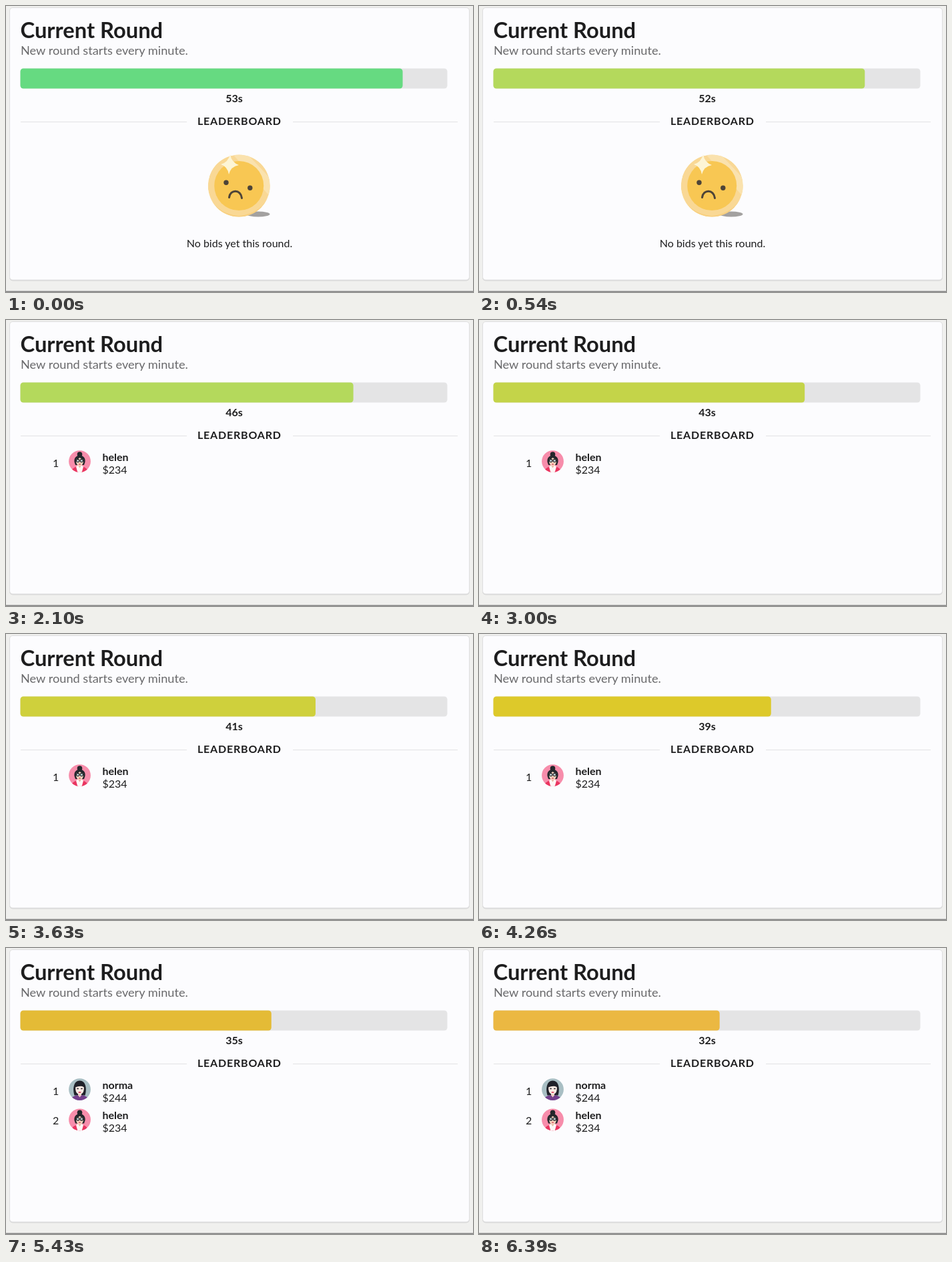
An HTML page for the animation above (6.57 s loop, 700 px wide and 428 px high).

```html
<!DOCTYPE html>
<html lang="en">
<head>
<meta charset="utf-8">
<title>Current Round</title>
<style>
  html, body { margin: 0; width: 100%; height: 100%; overflow: hidden; background: #f0f0ee; }
  svg { display: block; width: 700px; height: 428px; }
  text { font-family: Lato, "Open Sans", sans-serif; font-size: 16px; fill: #1d1d1e; }
  .bold { font-weight: 700; }
  .mid { text-anchor: middle; }
</style>
</head>
<body>
<svg viewBox="0 0 700 428">
  <defs>
    <clipPath id="disc"><circle r="16.4"/></clipPath>
    <clipPath id="coin"><circle cx="349.2" cy="269" r="46.5"/></clipPath>

    <g id="bun" clip-path="url(#disc)">
      <circle r="17" fill="#f78dab"/>
      <circle cy="-10.500" r="3.800" fill="#24262b"/>
      <path d="M-8 1C-10-12 10-12 8 1L6.500 5.500H-6.500Z" fill="#24262b"/>
      <path d="M-2.500 4H2.500V11H-2.500Z" fill="#e6b9a0"/>
      <path d="M-13 17C-12 10-7 8.500-3 7.500L0 13L3 7.500C7 8.500 12 10 13 17Z" fill="#ea3560"/>
      <path d="M-5.500 8L-2.500 6L0 10L2.500 6L5.500 8L3 17H-3Z" fill="#fdf7f6"/>
      <path d="M-5.500-4Q0-8 5.500-4V1Q4 7 0 7Q-4 7-5.500 1Z" fill="#f6d3bd"/>
      <path d="M-6-2.500Q-4-8 1-8Q6-8 6-2.500Q2-3.500 0-5.500Q-2-3-6-2.500Z" fill="#24262b"/>
      <g fill="#b9cdd0" stroke="#24262b" stroke-width="1.100">
        <circle cx="-2.800" cy="-1" r="2.200"/><circle cx="2.800" cy="-1" r="2.200"/>
      </g>
      <path d="M-1.500 4.300H1.500" stroke="#d8415a" stroke-width="1.200"/>
    </g>

    <g id="long" clip-path="url(#disc)">
      <circle r="17" fill="#a9bfc4"/>
      <path d="M-8 9C-11-1-9-13 0-13C9-13 11-1 8 9Z" fill="#20222a"/>
      <path d="M-14 17C-13 11-7 9.500-3 8.500H3C7 9.500 13 11 14 17Z" fill="#743f8c"/>
      <path d="M-2.500 4H2.500V9L0 12L-2.500 9Z" fill="#ecccc0"/>
      <path d="M-6.300-5H6.300V0Q5.500 7.500 0 7.500Q-5.500 7.500-6.300 0Z" fill="#fbebe4"/>
      <path d="M-7-3V-7Q0-12 7-7V-3Q4-4.500 2-5Q-3-4.500-7-3Z" fill="#20222a"/>
      <path d="M-4.200-1H-1.700M1.700-1H4.200" stroke="#20222a" stroke-width="1.500"/>
      <path d="M-1.800 4.300H1.800" stroke="#d52b4c" stroke-width="1.500"/>
    </g>
  </defs>

  <rect width="700" height="428" fill="#f0f0ee"/>
  <rect x="5" y="3.500" width="690" height="408" rx="5" fill="#d8d8d8"/>
  <rect x="5.500" y="2.500" width="689" height="407.500" rx="4.500" fill="#fcfcfe" stroke="#dededf"/>
  <rect y="426.500" width="700" height="1.500" fill="#858585"/>

  <text class="bold" x="21.500" y="48" style="font-size:32.7px">Current Round</text>
  <text x="22" y="73" style="font-size:18.2px;fill:#69696b">New round starts every minute.</text>

  <rect x="21.500" y="93.500" width="640" height="30" rx="4.500" fill="#e4e4e5"/>
  <rect id="bar" x="21.500" y="93.500" height="30" rx="4.500"/>
  <text id="clock" class="bold mid" x="342" y="143.500"></text>

  <path d="M22 173.500H271M430 173.500H677" stroke="#e3e3e4"/>
  <text class="bold" x="287" y="178" letter-spacing=".8">LEADERBOARD</text>

  <g id="empty">
    <ellipse cx="378" cy="311.500" rx="17.500" ry="4" fill="#a3a1a0"/>
    <g clip-path="url(#coin)">
      <circle cx="349.200" cy="269" r="46.500" fill="#f9d895"/>
      <path d="M362 222L400 262V290L340 222Z" fill="#fae2ae"/>
      <path d="M302 275Q310 310 349 314Q386 310 396 278V318H302Z" fill="#f8d080"/>
    </g>
    <circle cx="349.200" cy="269" r="37" fill="#f8c753"/>
    <path d="M336 222Q338 234 349 238Q337 240 334 252Q332 240 322 237Q333 234 336 222Z" fill="#fdf5d6"/>
    <g fill="#4d4438"><circle cx="330" cy="264.300" r="3.700"/><circle cx="365.800" cy="272.300" r="3.700"/></g>
    <path d="M334.500 286.500C336 274 352 274 353.500 287.500" fill="none" stroke="#4d4438" stroke-width="3" stroke-linecap="round"/>
    <text class="mid" x="350" y="360.500">No bids yet this round.</text>
  </g>
  <g id="board"></g>
</svg>

<script>
const LOOP = 6570, EASE_MS = 100;
const FIRST_BID = 690, SECOND_BID = 5250;
// Moments at which the countdown drops by one second
const TICKS = [-16, 290, 590, 890, 1190, 1480, 1780, 2099, 2392, 2695, 2992,
  3280, 3605, 3892, 4180, 4508, 4792, 5108, 5396, 5692, 5992, 6292];
const COLORS = [
  [0, 102, 218, 129], [500, 180, 217, 92], [2100, 180, 217, 92], [3630, 207, 208, 60],
  [4260, 221, 201, 42], [5430, 228, 187, 54], [6390, 235, 184, 66]
];
const LOW = { name: "helen", bid: "$234", face: "bun" };
const HIGH = { name: "norma", bid: "$244", face: "long" };

const get = id => document.getElementById(id);
const bar = get("bar"), clock = get("clock"), empty = get("empty"), board = get("board");
const mix = (a, b, p) => a + (b - a) * p;
const percent = s => Math.round(s / 60 * 100);

// CSS "ease": cubic-bezier(.25, .1, .25, 1)
function ease(x) {
  if (x <= 0 || x >= 1) return x <= 0 ? 0 : 1;
  const curve = (u, a, b) => 3 * u * (1 - u) ** 2 * a + 3 * u * u * (1 - u) * b + u ** 3;
  let lo = 0, hi = 1;
  for (let i = 0; i < 20; i++) {
    const m = (lo + hi) / 2;
    if (curve(m, .25, .25) < x) lo = m; else hi = m;
  }
  return curve(lo, .1, 1);
}

function colorAt(t) {
  const last = COLORS.at(-1);
  if (t >= last[0]) return `rgb(${last.slice(1)})`;
  const i = COLORS.findIndex(c => c[0] > t);
  const a = COLORS[i - 1], b = COLORS[i], p = (t - a[0]) / (b[0] - a[0]);
  return `rgb(${[1, 2, 3].map(k => Math.round(mix(a[k], b[k], p)))})`;
}

const row = (r, i) => `<g transform="translate(0 ${i * 45.3})">
  <text x="70" y="${220 - i * 1.3}">${i + 1}</text>
  <use href="#${r.face}" x="110.5" y="211.6"/>
  <text class="bold" x="144.5" y="210.5">${r.name}</text>
  <text x="144.5" y="229.5">${r.bid}</text></g>`;

let shown = -1;
function showBids(count) {
  if (count === shown) return;
  shown = count;
  empty.style.display = count ? "none" : "";
  board.innerHTML = [[], [LOW], [HIGH, LOW]][count].map(row).join("");
}

function draw(t) {
  const k = TICKS.filter(x => x <= t).length - 1;
  const left = 53 - k;
  const p = ease((t - TICKS[k]) / EASE_MS);
  bar.setAttribute("width", 6.4 * mix(percent(left + 1), percent(left), p));
  bar.setAttribute("fill", colorAt(t));
  clock.textContent = left + "s";
  showBids((t >= FIRST_BID) + (t >= SECOND_BID));
}

const start = performance.now();
function frame() {
  draw((performance.now() - start) % LOOP);
  requestAnimationFrame(frame);
}
draw(0);
requestAnimationFrame(frame);
</script>
</body>
</html>
```
